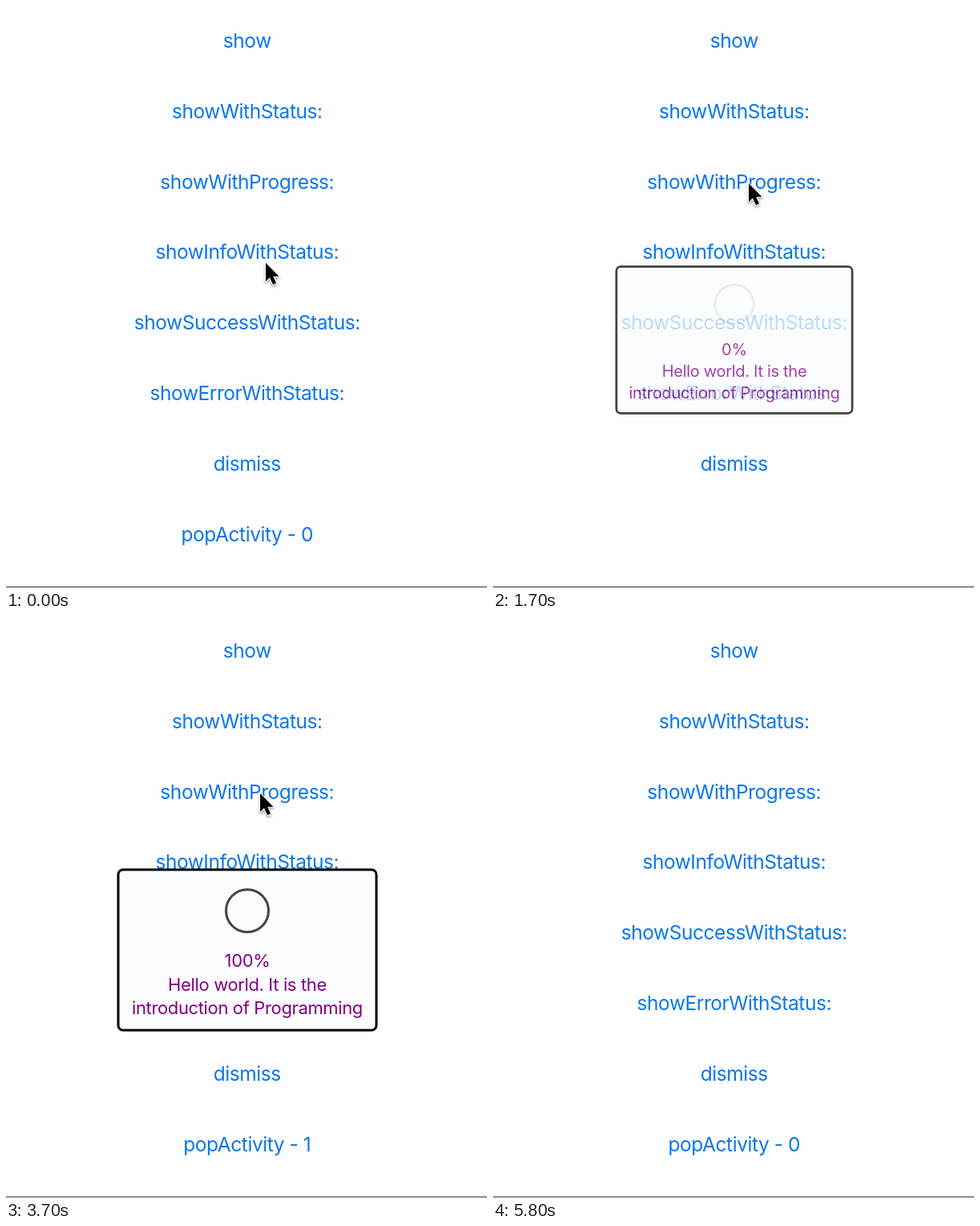
Animation of 600 by 725 pixels, one loop 5.9 s. Source, as an HTML page:

```html
<!DOCTYPE html>
<html lang="en">
<head>
<meta charset="utf-8">
<title>Progress HUD demo</title>
<style>
  html, body { margin: 0; width: 100%; height: 100%; overflow: hidden; background: #fefdff; }
  svg { display: block; width: 600px; height: 725px; }
  text { font-family: Inter, "Liberation Sans", sans-serif; text-anchor: middle; }
  #labels { font-size: 24.5px; letter-spacing: -.45px; fill: #0977e8; }
  #status { font-size: 22px; letter-spacing: -.36px; fill: #800080; }
  #hud { transform-origin: 301px 416px; }
  #cursor { filter: drop-shadow(0 2px 1.5px rgba(0, 0, 0, .35)); }
</style>
</head>
<body>
<svg viewBox="0 0 600 725">
  <rect width="600" height="725" fill="#fefdff"/>
  <rect y="723" width="600" height="1.3" fill="#58585a"/>
  <g id="labels"></g>
  <g id="hud">
    <rect x="140" y="316" width="322" height="200" rx="6" fill="#fbfcfe" stroke="#000" stroke-width="3"/>
    <g fill="none" stroke-width="3">
      <circle cx="301" cy="367.3" r="26.5" stroke="#e5e6e9"/>
      <circle id="ring" cx="301" cy="367.3" r="26.5" stroke="#454547" pathLength="100" transform="rotate(-90 301 367.3)"/>
    </g>
    <g id="status">
      <text id="percent" x="301" y="437"></text>
      <text x="301" y="466.5">Hello world. It is the</text>
      <text x="301" y="496">introduction of Programming</text>
    </g>
  </g>
  <g id="cursor">
    <path d="M0 0V23L5 18.3L9 27L13 25.3L9.3 16.8H16.5Z" fill="#000" stroke="#fff" stroke-width="2" stroke-linejoin="round" paint-order="stroke"/>
  </g>
</svg>
<script>
const LOOP = 5900, STEP = 100;
const SHOW = 1600, DISMISS = 4030, FADE = 150, RETITLE = 4200;
const names = ["show", "showWithStatus:", "showWithProgress:", "showInfoWithStatus:",
  "showSuccessWithStatus:", "showErrorWithStatus:", "dismiss", "popActivity - 0"];
// time, x, y of the pointer tip
const path = [[0, 324, 320], [500, 324, 320], [1300, 319, 221], [3500, 319, 221],
  [3700, 317, 221], [4200, 308, 8]];

const $ = id => document.getElementById(id);
const clamp = v => Math.min(1, Math.max(0, v));
const ramp = (t, from, length) => clamp((t - from) / length);
const ease = k => k * k * (3 - 2 * k);

const labels = names.map((name, i) => {
  const label = document.createElementNS("http://www.w3.org/2000/svg", "text");
  label.setAttribute("x", 300.8);
  label.setAttribute("y", 51.7 + 87.9 * i);
  label.textContent = name;
  return $("labels").appendChild(label);
});
const counter = labels[labels.length - 1];

function drawCursor(t) {
  const i = Math.max(1, path.findIndex(p => p[0] >= t));
  const [t0, x0, y0] = path[i - 1], [t1, x1, y1] = path[i];
  const k = ease(ramp(t, t0, t1 - t0));
  $("cursor").setAttribute("transform", `translate(${x0 + (x1 - x0) * k} ${y0 + (y1 - y0) * k})`);
  $("cursor").style.display = t > 4200 ? "none" : "";
}

function drawHud(t) {
  const into = ease(ramp(t, SHOW, FADE)), out = ease(ramp(t, DISMISS, FADE));
  const scale = out ? 1 - out * (1 - 1 / 1.3) : 1 - (1 - into) / 3;
  $("hud").style.opacity = into * (1 - out);
  $("hud").style.transform = `scale(${scale})`;
  const percent = 5 * Math.min(20, Math.max(0, Math.floor((t - 1650) / 100)));
  $("percent").textContent = percent + "%";
  $("ring").setAttribute("stroke-dasharray", percent < 100 ? `${percent} 200` : "none");
}

// The old title fades out, then the new one fades in.
function drawCounter(t) {
  const active = t >= SHOW + 100 && t < RETITLE + 100;
  const start = t < RETITLE ? SHOW : RETITLE;
  counter.textContent = "popActivity - " + (active ? 1 : 0);
  counter.style.opacity = t < start + 100 ? 1 - ramp(t, start, 100) : ramp(t, start + 100, 120);
}

function draw(t) {
  drawCursor(t);
  drawHud(t);
  drawCounter(t);
}

const begin = performance.now();
function tick() {
  const t = (performance.now() - begin) % LOOP;
  draw(Math.floor(t / STEP) * STEP);
  requestAnimationFrame(tick);
}
draw(0);
requestAnimationFrame(tick);
</script>
</body>
</html>
```
